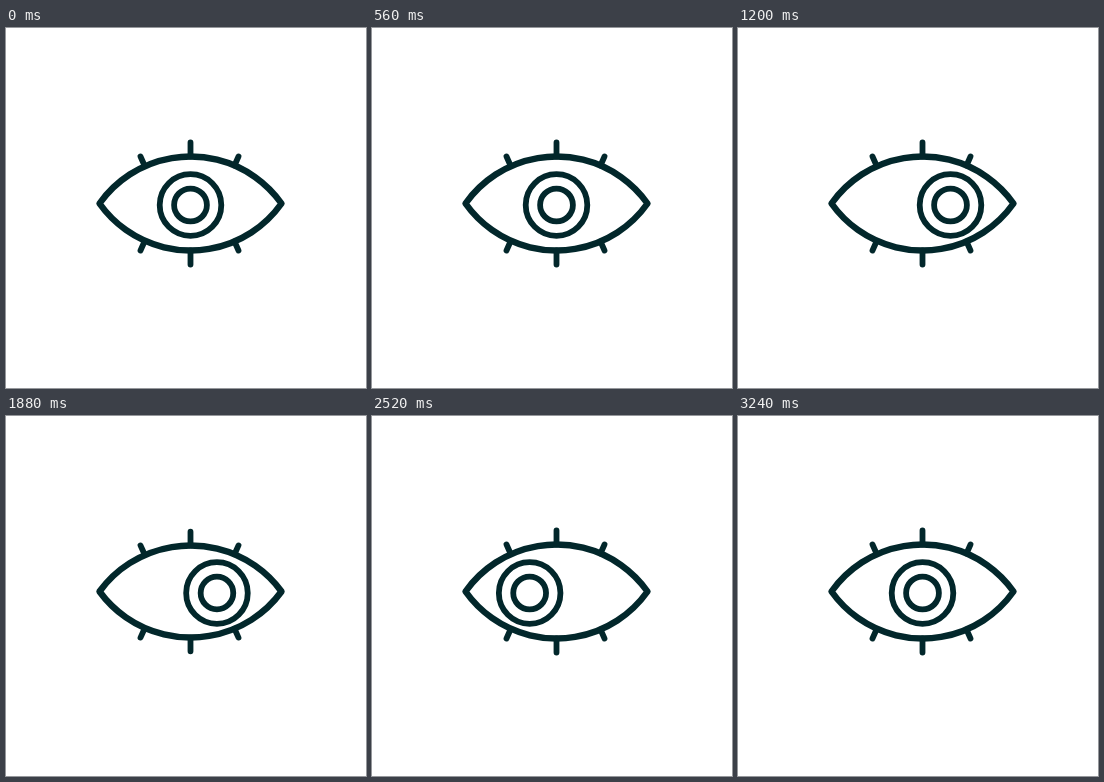
Recreate the animation shown at these times as an HTML page with a canvas. Size 360 by 360 pixels, loop 3480 ms.

```html
<!DOCTYPE html>
<html lang="en">
<head>
<meta charset="utf-8">
<title>Blinking eye</title>
<style>
  html, body { margin: 0; width: 100%; height: 100%; overflow: hidden; background: #fff; }
  canvas { display: block; width: 360px; height: 360px; }
</style>
</head>
<body>
<canvas id="stage"></canvas>
<script>
const LOOP = 3480, STEP = 40;
const INK = '#02272b';
const CENTER = { x: 184.5, y: 175.5 };
const HALF_WIDTH = 91, HALF_HEIGHT = 47;
const LID_RADIUS = (HALF_WIDTH ** 2 + HALF_HEIGHT ** 2) / (2 * HALF_HEIGHT);
const LID_ANGLE = Math.asin(HALF_WIDTH / LID_RADIUS);
const GAZE = 28;

const canvas = document.getElementById('stage');
const ctx = canvas.getContext('2d');
const ratio = window.devicePixelRatio || 1;
canvas.width = canvas.height = 360 * ratio;

// Cubic Bezier (.42, 0, .58, 1), solved for x by bisection.
function ease(x) {
  if (x <= 0) return 0;
  if (x >= 1) return 1;
  let lo = 0, hi = 1, s = 0.5;
  for (let i = 0; i < 24; i++) {
    s = (lo + hi) / 2;
    const r = 1 - s;
    if (3 * r * r * s * 0.42 + 3 * r * s * s * 0.58 + s ** 3 < x) lo = s;
    else hi = s;
  }
  return s * s * (3 - 2 * s);
}

const progress = (t, start, end) => ease((t - start) / (end - start));

function blink(t, start) {
  return progress(t, start, start + 280) - progress(t, start + 280, start + 560);
}

function gaze(t) {
  return GAZE * (progress(t, 800, 1200)
    - 2 * progress(t, 1840, 2180)
    + progress(t, 2400, 3240));
}

// Builds a path squashed vertically while the stroke keeps its width.
function squashed(openness, build) {
  ctx.save();
  ctx.translate(CENTER.x, CENTER.y);
  ctx.scale(1, openness);
  ctx.beginPath();
  build();
  ctx.restore();
}

function lids() {
  const drop = LID_RADIUS - HALF_HEIGHT, up = -Math.PI / 2;
  ctx.arc(0, drop, LID_RADIUS, up - LID_ANGLE, up + LID_ANGLE);
  ctx.arc(0, -drop, LID_RADIUS, -up - LID_ANGLE, -up + LID_ANGLE);
  ctx.closePath();
}

function lashes() {
  for (const side of [-1, 1]) {
    ctx.moveTo(0, side * HALF_HEIGHT);
    ctx.lineTo(0, side * 61);
    for (const dir of [-1, 1]) {
      ctx.moveTo(dir * 45 - 1, side * 38);
      ctx.lineTo(dir * 49 - 1, side * 47);
    }
  }
}

function ring(x, radius) {
  ctx.beginPath();
  ctx.arc(x, 177, radius, 0, Math.PI * 2);
  ctx.stroke();
}

function draw(t) {
  const closing = blink(t, 0) + blink(t, 1840);
  const lidScale = 1 - 0.525 * closing;
  const lashScale = 1 - 0.475 * closing;
  const irisX = CENTER.x + gaze(t);

  ctx.setTransform(ratio, 0, 0, ratio, 0, 0);
  ctx.fillStyle = '#fff';
  ctx.fillRect(0, 0, 360, 360);
  ctx.strokeStyle = INK;
  ctx.lineCap = ctx.lineJoin = 'round';

  ctx.save();
  squashed(lidScale, lids);
  ctx.clip();
  ctx.lineWidth = 5.8;
  ring(irisX, 30.8);
  ring(irisX, 16.4 - 2.2 * closing);
  ctx.restore();

  squashed(lidScale, lids);
  ctx.lineWidth = 6.4;
  ctx.stroke();
  squashed(lashScale, lashes);
  ctx.lineWidth = 5.8;
  ctx.stroke();
}

const begin = performance.now();
function tick() {
  const t = (performance.now() - begin) % LOOP;
  draw(Math.floor(t / STEP) * STEP);
  requestAnimationFrame(tick);
}
tick();
</script>
</body>
</html>
```
